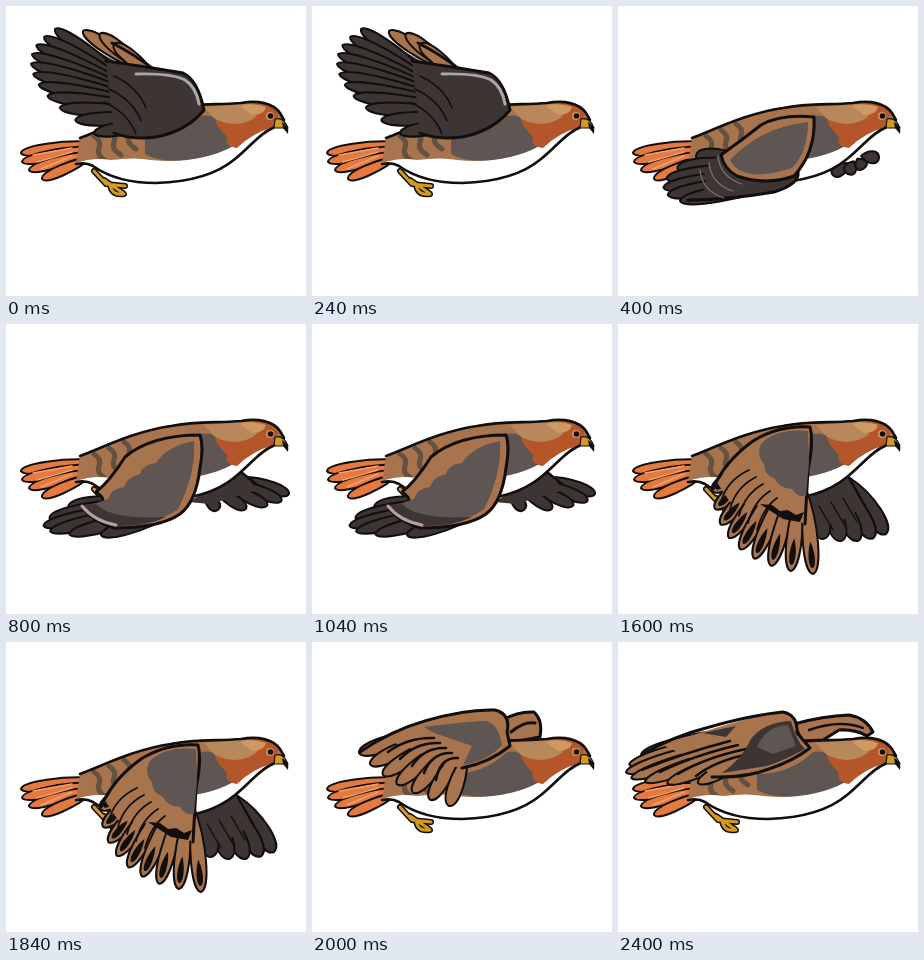
An HTML page that plays this animation: 300 by 290 pixels, repeating every 2.8 s.

```html
<!DOCTYPE html>
<html lang="en">
<head>
<meta charset="utf-8">
<title>Flying hawk</title>
<style>
  html, body { margin: 0; width: 100%; height: 100%; overflow: hidden; background: #fff; }
  svg { display: block; width: 100%; height: 100%; }
  path { stroke-linejoin: round; stroke-linecap: round; }
</style>
</head>
<body>
<svg id="stage" viewBox="0 0 300 290"></svg>
<script>
const BROWN = '#a8744e', TAN = '#cf9a62', RUST = '#b4562a', GREY = '#5f5553',
      DARK = '#3d3533', INK = '#120e0d', ORANGE = '#e57a40', GOLD = '#d39a1f';
const HOLD = 400;

const fill = (color, d) => `<path d="${d}" fill="${color}"/>`;
const line = (d, width = 2, color = INK) =>
  `<path d="${d}" fill="none" stroke="${color}" stroke-width="${width}"/>`;
const shape = (color, d, width = 3) => fill(color, d) + line(d, width);
const repeat = (count, draw) => Array.from({ length: count }, (_, i) => draw(i)).join('');

const mix = (a, b, t) => a.map((v, i) => v + (b[i] - v) * t);
const curve = (a, control, b, t) => mix(mix(a, control, t), mix(control, b, t), t);

// A rounded leaf from root to tip; width is the reach of its control points.
function leaf([x, y], [u, v], width) {
  const dx = u - x, dy = v - y, len = Math.hypot(dx, dy);
  const at = (t, side) =>
    [x + dx * t - dy / len * width * side, y + dy * t + dx / len * width * side]
      .map(n => n.toFixed(1)).join(' ');
  return `M${at(0, 0)}C${at(.4, 1)} ${at(.97, 1)} ${at(1, 0)}C${at(.97, -1)} ${at(.4, -1)} ${at(0, 0)}Z`;
}

// Feathers whose roots follow a straight line and whose tips follow a curve.
function fan(color, count, width, roots, tips, marked = false) {
  return repeat(count, i => {
    const t = i / (count - 1);
    const root = mix(...roots, t), tip = curve(...tips, t);
    const mark = marked ? fill(INK, leaf(mix(root, tip, .62), mix(root, tip, .93), width / 2.4)) : '';
    return shape(color, leaf(root, tip, width), 2) + mark;
  });
}

const tail = fan(ORANGE, 4, 7, [[88, 136], [88, 150]], [[15, 147], [12, 160], [36, 173]])
  + repeat(3, i => line(`M${27 + i * 4} ${149 + i * 7}L66 ${142 + i * 4}`, 1.5, '#f4a06a'));

const footPath = 'M88 165L100 178L119 180M98 174L117 187M104 179Q106 190 118 188';
const feet = line(footPath, 6) + line(footPath, 3, GOLD);

const back = 'M74 132C100 122 130 107 165 102C190 97 210 99 235 97C252 94 267 97 274 107L278 114L267 122';
const belly = 'C254 127 245 140 229 153C210 169 185 176 150 177C120 177 101 170 87 160Q80 156 70 158';
const body = fill(BROWN, back + belly)
  + repeat(3, i => line(`M${88 + i * 15} ${130 - i * 6}q8 5 5 12t7 13`, 5, '#66503f'))
  + fill('#fff', 'M70 157Q88 151 105 154Q130 151 145 154Q183 158 211 145Q236 129 266 121' + belly)
  + fill(GREY, 'M139 132Q172 132 195 110Q208 107 217 119Q225 130 240 132Q216 150 181 154Q154 157 139 148Z')
  + fill('#b9875c', 'M198 101L250 97L250 112Q230 122 212 116Z')
  + fill(RUST, 'M244 98Q262 95 273 106L268 121Q246 127 231 142Q218 140 221 131Q209 119 209 113Q226 121 240 116Q252 112 254 105Z')
  + fill(TAN, 'M234 100Q248 96 260 101Q258 109 246 109Z')
  + line(back + belly, 2.6)
  + shape(GOLD, 'M269 113Q278 111 282 122L276 122L268 122Z', 1.2)
  + fill(INK, 'M276 116Q284 120 282 128L277 122Z')
  + `<circle cx="264" cy="110" r="4" fill="${TAN}"/><circle cx="264.5" cy="110" r="2.8" fill="${INK}"/>`;

const poses = [
  { // wings high
    far: fan(BROWN, 3, 9, [[143, 68], [151, 72]], [[77, 25], [95, 24], [108, 38]])
      + shape(BROWN, 'M106 37Q128 48 150 65L132 70')
      + fill(DARK, 'M84 41L132 68L108 66Z'),
    near: fan(DARK, 11, 9, [[128, 80], [165, 114]], [[49, 23], [-14, 61], [88, 127]])
      + shape(DARK, 'M100 55Q148 62 177 67Q192 74 198 104Q181 125 150 131Q124 134 108 127')
      + repeat(3, i => line(`M${108 - i * 5} ${70 + i * 13}q24 11 32 32`, 1.5))
      + line('M130 68Q165 67 179 74Q190 81 193 98', 3, '#aaa7a6')
  },
  { // folding below the body
    far: fan(DARK, 4, 8, [[232, 158], [243, 150]], [[214, 168], [238, 172], [261, 152]]),
    near: fan(DARK, 6, 10, [[120, 150], [168, 176]], [[78, 150], [22, 182], [62, 195]])
      + fill(DARK, 'M103 146Q110 172 180 166Q182 178 156 186Q110 194 78 193Q94 180 85 166Z')
      + line('M180 166Q182 178 156 186Q110 194 70 194', 3)
      + repeat(3, i => line(`M${100 - i * 9} ${150 + i * 7}q2 21 24 28`, 1.3, '#777170'))
      + shape(BROWN, 'M103 149Q124 134 143 119Q163 108 196 111Q198 146 176 170Q148 180 119 170Q106 163 103 149Z')
      + fill(GREY, 'M112 154Q143 121 190 116Q190 146 174 162Q124 178 112 154Z')
  },
  { // halfway down
    far: fan(DARK, 5, 8, [[235, 153], [198, 168]], [[283, 170], [275, 185], [212, 186]])
      + fill(DARK, 'M182 178Q207 163 235 148L252 166L204 180Z')
      + line('M212 161Q225 152 235 148L250 160', 2.6),
    near: fan(DARK, 6, 9, [[110, 174], [168, 190]], [[62, 184], [0, 212], [95, 211]])
      + shape(BROWN, 'M88 182Q105 178 90 168Q104 157 119 133Q145 111 194 111Q198 122 194 144Q190 178 174 190Q154 204 108 204Q84 196 76 182')
      + fill(GREY, 'M188 117Q161 122 150 139Q137 140 134 150Q121 153 118 163Q106 164 102 175L82 182Q92 198 116 199Q155 199 172 185Q190 150 188 117Z')
      + fill(DARK, 'M90 180Q105 196 160 193Q140 203 108 202Q84 194 76 182Z')
      + line('M76 182Q88 197 110 201', 3, '#b7a09a')
  },
  { // lowest, near wing spread
    far: shape(DARK, 'M207 164L240 151Q254 154 259 170Q276 186 273 212Q271 243 259 242Q248 246 241 235L214 234Z', 2.6)
      + line('M226 179Q243 181 250 195M224 197Q238 197 245 210', 1.4),
    near: fan(BROWN, 11, 9, [[150, 140], [208, 205]], [[103, 172], [75, 308], [205, 245]])
      + fill(BROWN, 'M116 150Q128 118 163 106L194 104Q197 137 209 162Q226 190 222 206Q217 230 201 245L166 216L128 180L106 170Z')
      + line('M104 170Q116 152 113 145Q130 112 163 106L194 104Q197 137 209 162Q226 190 222 206Q217 230 201 245', 3)
      + repeat(6, i => line(`M${108 + i * 4} ${180 + i * 10}q22 ${-6 + i} ${36 - i} ${-6 + i * 2}`, 1.6))
      + fill(INK, 'M164 221L176 228L182 226L190 232L183 242L172 234Z')
      + fill(GREY, 'M149 131Q163 125 184 126Q196 150 209 172Q220 196 211 216Q196 229 180 226Q178 213 168 211Q166 199 156 196Q158 186 147 178Q155 166 149 158Q144 144 149 131Z')
  },
  { // downstroke with open tips
    far: fan(DARK, 5, 12, [[232, 154], [200, 172]], [[268, 210], [244, 221], [205, 215]])
      + fill(DARK, 'M188 173L230 152L246 183L221 198L196 203Z')
      + line('M230 152L247 182', 2.4)
      + repeat(3, i => line(`M${225 - i * 12} ${174 + i * 4}l14 24`, 1.4)),
    near: fan(BROWN, 9, 10, [[142, 135], [188, 165]], [[94, 167], [100, 242], [195, 250]], true)
      + fill(BROWN, 'M100 160Q108 138 135 119Q161 101 192 103L189 155L187 200L145 182L112 178Z')
      + line('M95 165Q106 138 135 117Q161 101 192 103Q196 118 190 146L187 200', 3)
      + repeat(5, i => line(`M${103 + i * 9} ${178 + i * 7}q6 -22 ${28 - i * 2} -32`, 1.8))
      + fill(INK, 'M142 180L154 181L162 187L170 186L178 191L186 188L182 198L165 195Z')
      + fill(GREY, 'M190 107Q158 104 143 120Q138 132 146 140Q146 151 156 154Q162 165 174 165Q180 174 188 172L191 139Z')
  },
  { // recovering upward
    far: shape(BROWN, 'M190 78Q207 69 222 70Q231 78 228 95L197 101Z') + line('M199 90Q212 79 223 81', 3),
    near: fan(BROWN, 7, 10, [[116, 88], [155, 110]], [[47, 111], [78, 147], [137, 164]])
      + fill(BROWN, 'M70 97Q130 70 183 68Q199 72 195 90L198 104Q177 121 150 126L130 122L98 106Z')
      + line('M48 110Q78 89 113 79Q153 67 183 68Q199 72 195 90L198 104Q177 121 150 126', 3)
      + repeat(5, i => line(`M${76 + i * 12} ${110 + i * 7}Q${96 + i * 8} ${95 + i * 5} ${122 + i * 6} ${96 + i * 5}`, 2.6))
      + fill(GREY, 'M112 85Q150 80 172 79Q186 80 190 103Q176 119 151 123L160 104L140 97L122 91Z')
  },
  { // wings swept back
    far: shape(BROWN, 'M176 82Q205 74 231 73Q248 76 255 90L249 94Q237 87 221 88L205 98L184 99Z')
      + line('M191 88Q222 77 245 86', 2.4),
    near: fan(BROWN, 7, 9, [[112, 88], [145, 108]], [[23, 113], [-25, 145], [80, 141]])
      + fill(BROWN, 'M45 103Q133 73 165 70Q180 73 179 91L192 106Q175 119 151 127Q128 136 94 135L80 120Z')
      + line('M25 112Q56 94 88 86Q133 73 165 70Q180 73 179 91L192 106Q175 119 151 127Q128 136 94 135', 3)
      + repeat(4, i => line(`M${24 + i * 18} ${128 + i * 2}Q${62 + i * 12} ${112 + i * 2} ${112 + i * 8} ${99 + i * 4}`, 2.4))
      + fill(DARK, 'M84 91L118 84L108 95ZM133 97Q146 80 173 79Q178 99 187 107Q165 119 149 124L104 131Q124 117 133 97Z')
      + fill(GREY, 'M139 105Q148 84 170 83L178 104L155 112Z')
  }
];

const stage = document.getElementById('stage');
const layer = key => poses.map(pose => `<g class="${key}">${pose[key]}</g>`).join('');
stage.innerHTML = layer('far') + feet + tail + body + layer('near');
const layers = ['far', 'near'].map(key => [...stage.querySelectorAll('.' + key)]);

function draw() {
  const current = Math.floor(performance.now() / HOLD) % poses.length;
  for (const groups of layers)
    groups.forEach((group, i) => group.style.display = i === current ? '' : 'none');
  requestAnimationFrame(draw);
}
draw();
</script>
</body>
</html>
```
